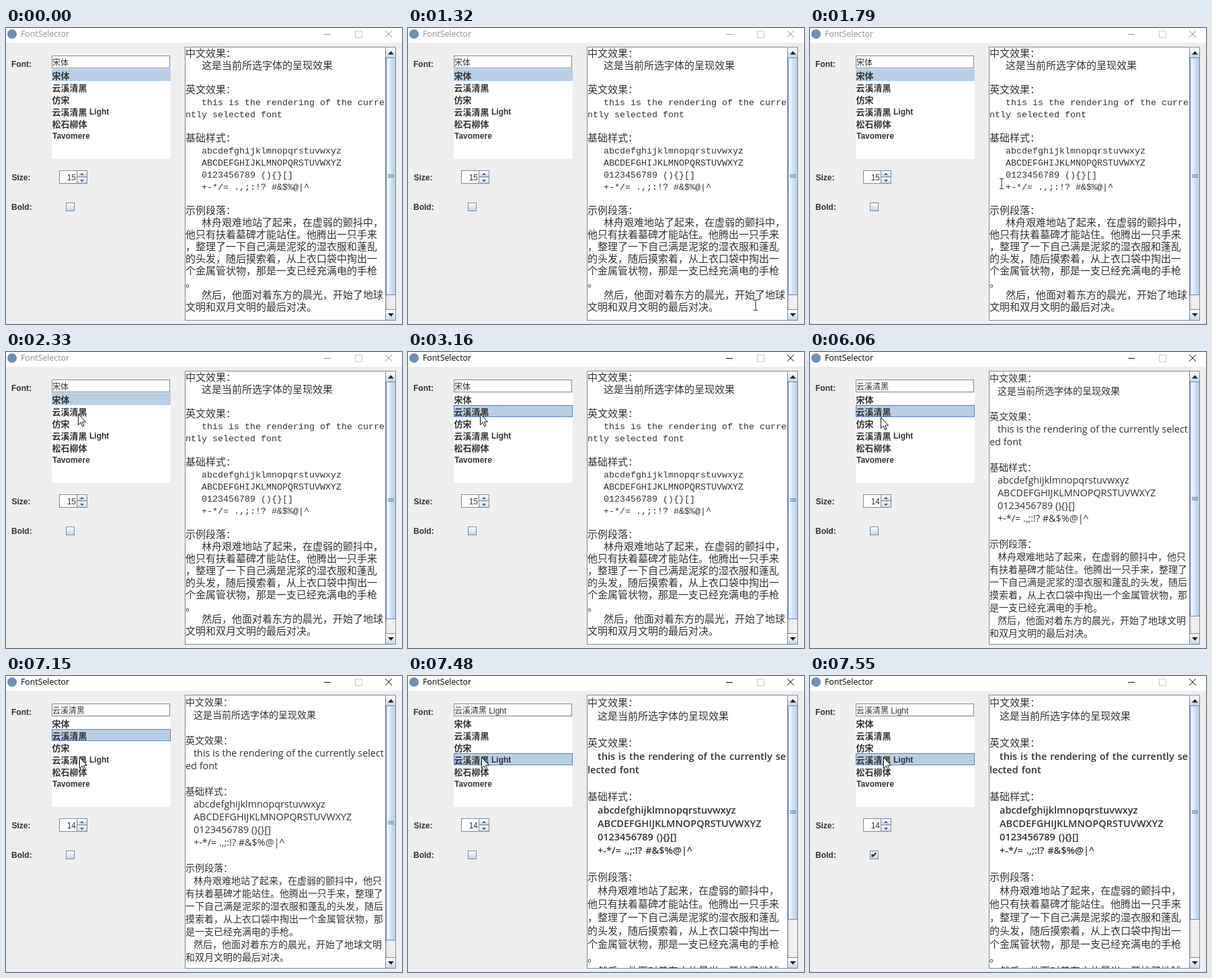
These frames come from a looping animation (589 px wide and 441 px high, 8 s). An HTML page:

```html
<!DOCTYPE html>
<html lang="zh-CN">
<head>
<meta charset="utf-8">
<style>
html, body { margin: 0; width: 100%; height: 100%; overflow: hidden; background: #eee; }
svg { display: block; width: 589px; height: 441px; text-spacing-trim: space-all; }
text { fill: #333; font: 12px "Liberation Sans", "Noto Sans CJK SC", "Noto Sans CJK", sans-serif; }
.b { font-weight: bold; }
.title { font: 12.3px "Open Sans", sans-serif; }
.cjk { font-family: "Noto Sans CJK SC", "Noto Sans CJK", sans-serif; }
</style>
</head>
<body>
<svg id="stage" viewBox="0 0 589 441" lang="zh-CN">
  <defs>
    <linearGradient id="across">
      <stop offset="0" stop-color="#c9dbec"/><stop offset=".2" stop-color="#f4f8fc"/>
      <stop offset=".5" stop-color="#d3e2f0"/><stop offset="1" stop-color="#b4cce4"/>
    </linearGradient>
    <linearGradient id="down" x2="0" y2="1">
      <stop offset="0" stop-color="#fff"/><stop offset="1" stop-color="#c3d6e8"/>
    </linearGradient>
    <clipPath id="page"><rect x="267" y="29" width="298" height="406"/></clipPath>
  </defs>
</svg>
<script>
const stage = document.getElementById('stage');
const EDGE = '#7a8a99', BLUE = '#6382bf', PICK = '#b8cfe5';

function add(tag, attrs, parent = stage) {
  const el = document.createElementNS('http://www.w3.org/2000/svg', tag);
  for (const key in attrs) el.setAttribute(key, attrs[key]);
  parent.appendChild(el);
  return el;
}
const box = (x, y, width, height, fill, stroke = 'none', parent = stage) =>
  add('rect', { x, y, width, height, fill, stroke }, parent);
const path = (d, attrs, parent) => add('path', { d, fill: 'none', ...attrs }, parent);
function label(x, y, str, attrs = {}, parent = stage) {
  const el = add('text', { x, y, ...attrs }, parent);
  el.textContent = str;
  return el;
}
const show = (el, on) => { el.style.display = on ? '' : 'none'; };

// Title bar
box(0, 0, 589, 22, '#fff');
add('circle', { cx: 9, cy: 9, r: 7, fill: '#6f8fb3' });
const title = label(22, 13, 'FontSelector', { class: 'title' });
box(519.5, 4.5, 10, 10, 'none', '#ccc');
const buttons = path('M473 9.5h10M564 4l10 10m0-10l-10 10', {});

// Form
label(8, 58, 'Font:', { class: 'b' });
label(8.5, 227, 'Size:', { class: 'b' });
label(8, 271, 'Bold:', { class: 'b' });

box(68.5, 41.5, 175, 18, '#fff', EDGE);
const field = label(69, 56, '');

const fonts = ['宋体', '云溪清黑', '仿宋', '云溪清黑 Light', '松石柳体', 'Tavomere'];
box(68, 61, 177, 134, '#fff');
const pick = box(68.5, 61.5, 176, 17, PICK);
fonts.forEach((name, i) => {
  const [main, extra] = name.split(' ');
  const latin = /^\w+$/.test(main);
  const y = 75 + 18 * i;
  label(latin ? 69 : 68.5, y + (latin ? 0 : .7), main, { class: 'b', style: latin ? '' : 'font-size:13px' });
  if (extra) label(124, y, extra, { class: 'b' });
});

box(79.5, 212.5, 41, 19, '#fff', EDGE);
const size = label(104, 227, '', { 'text-anchor': 'end' });
box(105.5, 212.5, 15, 9.5, 'url(#down)', EDGE);
box(105.5, 222, 15, 9.5, 'url(#down)', EDGE);
path('M110 219h6l-3-3zM110 226h6l-3 3z', { fill: '#556' });

box(89.5, 260.5, 12, 12, 'url(#down)', EDGE);
const check = path('M92.5 265.5v4M93.5 268.5l5-5', { stroke: '#222', 'stroke-width': 2 });

// Text pane with scroll bar
box(266.5, 28.5, 313, 407, '#fff', EDGE);
box(565, 29, 14, 406, '#eee');
path('M564.5 29v406', { stroke: EDGE });
path('M566 45v374', { stroke: '#d2d2d2', 'stroke-width': 2 });
box(565, 29, 14, 15, 'url(#down)');
box(565, 420, 14, 15, 'url(#down)');
path('M565 44.5h14M565 419.5h14', { stroke: EDGE });
path('M568 39.5h9l-4.5-5zM568 425h9l-4.5 5z', { fill: '#222' });

const head = ['中文效果：', ' 这是当前所选字体的呈现效果', '', '英文效果：'];
const samples = ['', '基础样式：', ' abcdefghijklmnopqrstuvwxyz', ' ABCDEFGHIJKLMNOPQRSTUVWXYZ',
  ' 0123456789 (){}[]', ' +-*/= .,;:!? #&$%@|^', '', '示例段落：'];
const english = 'this is the rendering of the currently selected font';
const story = [
  '林舟艰难地站了起来，在虚弱的颤抖中，他只有扶着墓碑才能站住。他腾出一只手来，整理了一下自己满是泥浆的湿衣服和蓬乱的头发，随后摸索着，从上衣口袋中掏出一个金属管状物，那是一支已经充满电的手枪。',
  '然后，他面对着东方的晨光，开始了地球文明和双月文明的最后对决。'
];

// First line is indented and one character shorter.
function wrap(str, n) {
  const lines = [' ' + str.slice(0, n - 1)];
  for (let i = n - 1; i < str.length; i += n) lines.push(str.slice(i, i + n));
  return lines;
}

function makePage({ cut, cols, top, pitch, indent, han, latin, thumb }) {
  const g = add('g', {});
  const body = add('g', { 'clip-path': 'url(#page)' }, g);
  const lines = [...head, ' ' + english.slice(0, cut), english.slice(cut), ...samples,
    ...story.flatMap(s => wrap(s, cols))];
  lines.forEach((line, i) => {
    const ascii = /^[\x00-\x7f]*$/.test(line);
    const x = 267 + (line[0] === ' ' ? indent : 0);
    label(x, top + pitch * i, line.trim(), ascii ? { style: latin } : { class: 'cjk', style: han }, body);
  });
  box(565.5, 44.5, 14, thumb - 44, 'url(#across)', BLUE, g);
  const mid = Math.round((44 + thumb) / 2);
  path(`M568 ${mid - 2.5}h9m-9 2h9m-9 2h9`, { stroke: BLUE }, g);
  return g;
}

const pages = [
  { cut: 34, cols: 19, top: 43, pitch: 18, indent: 24, thumb: 397,
    han: 'font-size:15px;font-weight:300',
    latin: 'font:13.333px "Liberation Mono",monospace' },
  { cut: 45, cols: 21, top: 44, pitch: 19, indent: 12, thumb: 393,
    han: 'font-size:14px',
    latin: 'font:14.4px "Open Sans",sans-serif' },
  { cut: 41, cols: 19, top: 45, pitch: 20, indent: 15, thumb: 362,
    han: 'font-size:15px;font-weight:500',
    latin: 'font:600 14.5px "Open Sans",sans-serif;word-spacing:1.2px' }
].map(makePage);

// Pointers
const arrow = path('M.5 .5v16l3.7-3.5 2.6 5.8 2.3-1-2.6-5.7h5z', { fill: '#fff', stroke: '#111' });
const beam = path('M-3 -7.5h2.5l.5 .5 .5-.5h2.5M0 -7v14M-3 7.5h2.5l.5-.5 .5 .5h2.5', { stroke: '#222' });

// [start, step length, steps, from, to]; the pointer jumps once per step.
const moves = [
  [1320, 68, 12, [517, 413], [108, 94]],
  [2270, 60, 2, [108, 93], [107, 92]],
  [6060, 69, 10, [105, 97], [107, 138]],
  [7080, 70, 2, [108, 130], [109, 121]]
];
const ease = p => p * p * (3 - 2 * p);

function pointerAt(t) {
  const move = moves.filter(m => m[0] <= t).pop();
  if (!move) return null;
  const [start, len, n, from, to] = move;
  const p = ease(Math.min(Math.floor((t - start) / len), n - 1) / (n - 1));
  return from.map((v, i) => Math.round(v + (to[i] - v) * p));
}

const after = (t, ...times) => times.filter(s => t >= s).length;

function draw(t) {
  const active = t >= 3090;
  title.style.fill = active ? '#000' : '#909090';
  buttons.setAttribute('stroke', active ? '#111' : '#999');

  const row = [0, 1, 3][after(t, 3090, 7350)];
  pick.setAttribute('y', 61.5 + 18 * row);
  pick.setAttribute('stroke', active ? BLUE : PICK);
  field.textContent = fonts[[0, 1, 3][after(t, 3190, 7350)]];

  const page = after(t, 3190, 7450);
  pages.forEach((g, i) => show(g, i === page));
  size.textContent = t < 3290 ? 15 : 14;
  show(check, t >= 7550);

  const pos = pointerAt(t);
  const inText = pos && pos[0] > 266;
  show(beam, inText);
  show(arrow, pos && !inText);
  if (pos) (inText ? beam : arrow).setAttribute('transform', `translate(${pos})`);
}

const begin = performance.now();
function tick() {
  draw((performance.now() - begin) % 8000);
  requestAnimationFrame(tick);
}
tick();
</script>
</body>
</html>
```
